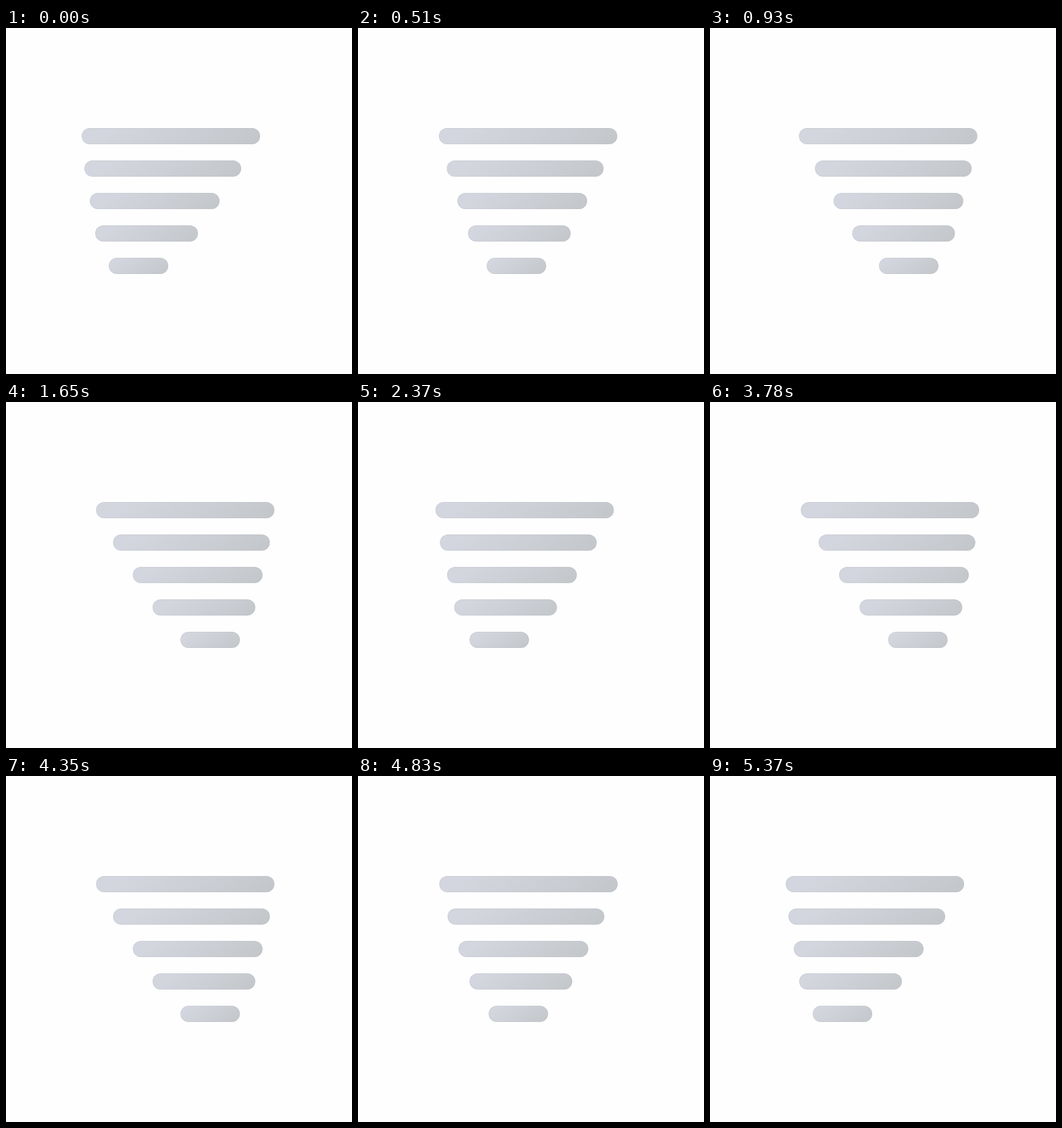
Write an HTML page that moves like this. It is 512x512 px and loops after 5430 ms.

```html
<!DOCTYPE html>
<html lang="en">
<head>
<meta charset="utf-8">
<title>Swaying bars</title>
<style>
  html, body { margin: 0; width: 100%; height: 100%; overflow: hidden; background: #fefefe; }
  .bar {
    position: absolute;
    height: 24px;
    border-radius: 12px;
    background: linear-gradient(145deg, #d3d6de 15%, #c3c6c9);
    box-shadow: inset 0 0 0 1px rgba(178, 182, 192, .22);
  }
</style>
</head>
<body>
<script>
  const LOOP = 5430, STEP = 30, LAST = 5370;
  const SWING = 1350;  // one sweep from side to side
  const LEAD = 20;     // the sway is already slightly under way at the start
  const WIDTHS = [264, 232, 192, 152, 88];

  const bars = WIDTHS.map((width, i) => {
    const el = document.createElement('div');
    el.className = 'bar';
    el.style.width = width + 'px';
    el.style.left = 256 - width / 2 + 'px';
    el.style.top = 148 + 48 * i + 'px';
    document.body.append(el);
    return { el, reach: 12 * (i + 1) };
  });

  // cubic-bezier(.42, 0, .58, 1)
  function easeInOut(x) {
    let lo = 0, hi = 1, s = 0.5;
    for (let i = 0; i < 24; i++) {
      s = (lo + hi) / 2;
      const r = 1 - s;
      const at = 3 * r * r * s * 0.42 + 3 * r * s * s * 0.58 + s * s * s;
      if (at < x) lo = s; else hi = s;
    }
    return s * s * (3 - 2 * s);
  }

  function sway(t) {
    const u = ((t + LEAD) / SWING) % 2;
    return 2 * easeInOut(u < 1 ? u : 2 - u) - 1;
  }

  function draw(ms) {
    const t = Math.min(Math.floor((ms % LOOP) / STEP) * STEP, LAST);
    const s = sway(t);
    for (const { el, reach } of bars) {
      el.style.transform = `translateX(${(s * reach).toFixed(3)}px)`;
    }
  }

  const start = performance.now();
  function tick() {
    draw(Math.max(0, performance.now() - start));
    requestAnimationFrame(tick);
  }
  tick();
</script>
</body>
</html>
```
